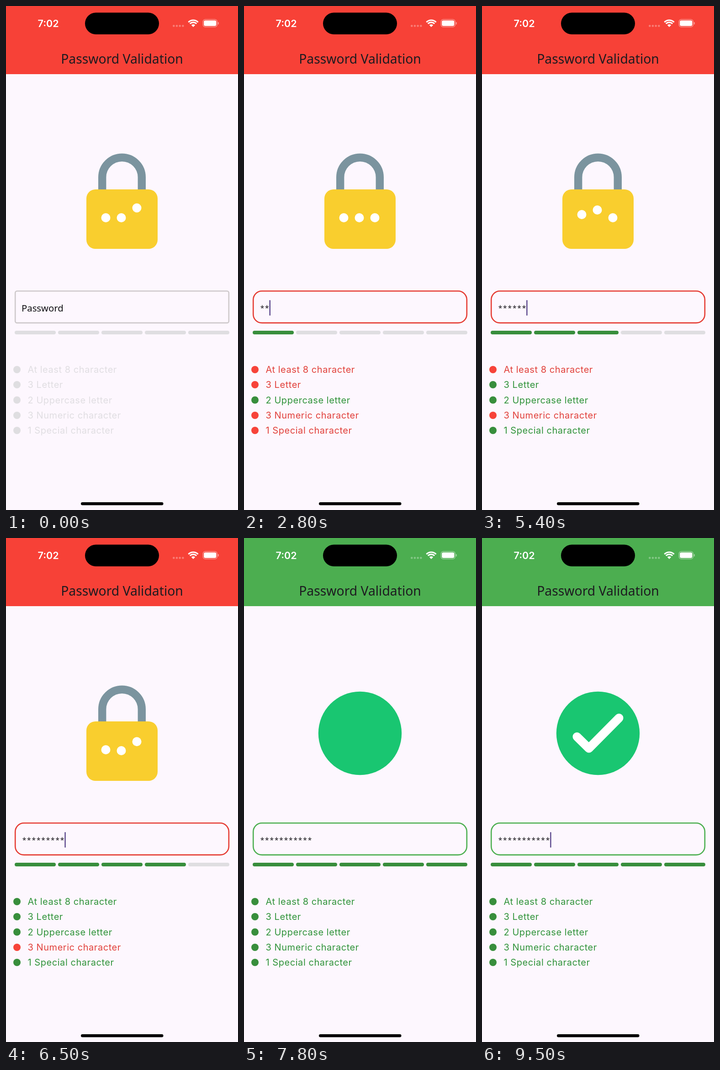
An HTML page with a canvas that plays this animation: 508 px wide and 1102 px high, repeating every 9.6 s.

```html
<!DOCTYPE html>
<html lang="en">
<head>
<meta charset="utf-8">
<title>Password Validation</title>
<style>
  html, body { margin: 0; width: 100%; height: 100%; overflow: hidden; background: #fdf7fe; }
  canvas { display: block; width: 508px; height: 1102px; }
</style>
</head>
<body>
<canvas id="stage" width="508" height="1102"></canvas>
<script>
const ctx = document.getElementById('stage').getContext('2d');

const LOOP = 9600, STEP = 100;
const FOCUS = 1200, VALID = 7200, SWAP = 7400;
const FADE_DELAY = 100, FADE = 200;
const KEYS = [2000, 2500, 3000, 3400, 4500, 5000, 5700, 6000, 6300, 6700, VALID];

const GREY = [223, 222, 225], RED = [247, 67, 57], GREEN = [56, 142, 60];
const BORDER_GREY = [206, 201, 203], BORDER_RED = [229, 61, 52], BORDER_GREEN = [76, 175, 80];

// Each rule is met by a certain keystroke.
const RULES = [
  { text: 'At least 8 character', y: 795, met: KEYS[7] },
  { text: '3 Letter', y: 828, met: KEYS[2] },
  { text: '2 Uppercase letter', y: 861.5, met: KEYS[1] },
  { text: '3 Numeric character', y: 895, met: KEYS[10] },
  { text: '1 Special character', y: 928, met: KEYS[5] },
];

// Height of one bouncing dot: [ms, px]
const BOUNCE = [[0, 0], [33, 17], [67, 21.5], [100, 27.5], [133, 28.5],
                [200, 7], [233, 0], [300, -3], [400, 0]];

const clamp = v => Math.max(0, Math.min(1, v));
const lerp = (a, b, k) => a + (b - a) * k;
const easeOut = k => 1 - (1 - k) ** 3;
const rgb = c => `rgb(${c.map(Math.round).join(',')})`;
const mix = (a, b, k) => rgb(a.map((v, i) => lerp(v, b[i], k)));

function fadeThrough(t, met, [idle, bad, good]) {
  const progress = start => clamp((t - start - FADE_DELAY) / FADE);
  return t < met ? mix(idle, bad, progress(FOCUS)) : mix(bad, good, progress(met));
}

function box(x, y, w, h, r, color) {
  ctx.beginPath();
  ctx.roundRect(x, y, w, h, r);
  ctx.fillStyle = color;
  ctx.fill();
}

function disc(x, y, r, color) {
  ctx.beginPath();
  ctx.arc(x, y, r, 0, Math.PI * 2);
  ctx.fillStyle = color;
  ctx.fill();
}

function text(str, x, y, font, color, spacing = 0, align = 'left') {
  ctx.font = font;
  ctx.fillStyle = color;
  ctx.textAlign = align;
  ctx.letterSpacing = spacing + 'px';
  ctx.fillText(str, x, y);
}

function drawWifi() {
  const x = 410, y = 46, spread = Math.PI * 0.25;
  const arc = r => ctx.arc(x, y, r, -Math.PI / 2 - spread, -Math.PI / 2 + spread);
  ctx.lineCap = 'butt';
  ctx.lineWidth = 3;
  ctx.strokeStyle = '#fff';
  for (const r of [10.2, 15]) {
    ctx.beginPath();
    arc(r);
    ctx.stroke();
  }
  ctx.beginPath();
  ctx.moveTo(x, y);
  arc(6);
  ctx.fillStyle = '#fff';
  ctx.fill();
}

function drawHeader(t) {
  ctx.fillStyle = t < VALID ? '#f74137' : '#4cae50';
  ctx.fillRect(0, 0, 508, 149);
  text('7:02', 69.5, 46, '600 21.5px Inter, sans-serif', '#fff');
  box(173, 14.5, 162, 47.5, 23.75, '#000');
  for (let i = 0; i < 4; i++) disc(367.3 + i * 6.7, 43.5, 2.3, 'rgba(255,255,255,.32)');
  drawWifi();

  ctx.beginPath();
  ctx.roundRect(431.2, 29.4, 31.2, 16.4, 5);
  ctx.lineWidth = 1.2;
  ctx.strokeStyle = 'rgba(255,255,255,.5)';
  ctx.stroke();
  box(433.2, 31.4, 27.2, 12.4, 3.3, '#fff');
  box(463.9, 35, 1.9, 5.5, 1, 'rgba(255,255,255,.5)');

  text('Password Validation', 254, 125.5, '500 28.3px "Noto Sans", sans-serif', '#1d1b20', 0, 'center');
}

function bounce(ms) {
  for (let i = 1; i < BOUNCE.length; i++) {
    const [t0, h0] = BOUNCE[i - 1], [t1, h1] = BOUNCE[i];
    if (ms >= t0 && ms <= t1) return lerp(h0, h1, (ms - t0) / (t1 - t0));
  }
  return 0;
}

function drawLock(t) {
  ctx.beginPath();
  ctx.moveTo(210.7, 404);
  ctx.lineTo(210.7, 374.5);
  ctx.arc(254, 374.5, 43.3, Math.PI, 0);
  ctx.lineTo(297.3, 404);
  ctx.lineCap = 'butt';
  ctx.lineWidth = 17.4;
  ctx.strokeStyle = '#7b949f';
  ctx.stroke();
  box(176, 401, 156, 130, 20, '#f9ce2e');

  // The bounce starts over once the password is valid.
  const phase = t < VALID ? (t + 400) % 800 : t - VALID;
  for (let i = 0; i < 3; i++) {
    disc(218.5 + i * 34, 463 - bounce(phase - i * 500 / 3), 10, '#fff');
  }
}

function drawCheck(ms) {
  disc(254, 427, 91.2 * easeOut(clamp((ms + 100) / 500)), '#19c671');
  if (ms < 800) return;
  if (ms < 1000) {
    disc(210.5, 436.5, lerp(7, 14, clamp((ms - 800) / 100)), '#fff');
    return;
  }
  const pts = [[208, 434.5], [234, 460], [300, 393.5]];
  const legs = [1, 2].map(i => Math.hypot(pts[i][0] - pts[i - 1][0], pts[i][1] - pts[i - 1][1]));
  const k = easeOut(clamp((ms - 900) / 500));
  let left = k * (legs[0] + legs[1]);
  ctx.beginPath();
  ctx.moveTo(...pts[0]);
  legs.forEach((len, i) => {
    const part = clamp(left / len);
    if (part > 0) ctx.lineTo(lerp(pts[i][0], pts[i + 1][0], part), lerp(pts[i][1], pts[i + 1][1], part));
    left -= len;
  });
  ctx.lineCap = ctx.lineJoin = 'round';
  ctx.lineWidth = lerp(28, 19, k);
  ctx.strokeStyle = '#fff';
  ctx.stroke();
}

function drawField(t) {
  const typed = KEYS.filter(k => t >= k);
  const radius = lerp(4, 19, clamp((t - FOCUS) / FADE));
  ctx.beginPath();
  ctx.roundRect(20.2, 623.3, 467.7, 69.6, radius);
  ctx.lineWidth = 2.6;
  ctx.strokeStyle = fadeThrough(t, VALID, [BORDER_GREY, BORDER_RED, BORDER_GREEN]);
  ctx.stroke();

  if (typed.length) {
    text('*'.repeat(typed.length), 34.7, 667.5, '17.33px "Noto Sans Mono", monospace', '#1d1b20');
  } else {
    text('Password', 34, 667.5, '20.3px "Noto Sans", sans-serif', '#111014');
  }

  // The caret blinks once a second, beginning anew with each key.
  const since = t - (typed.at(-1) ?? FOCUS);
  if (since >= 0 && since % 1000 < 500) {
    box(34.7 + typed.length * 10.4, 643, 2.5, 34, 1.2, '#5f4b8f');
  }
}

function drawRules(t) {
  const met = RULES.filter(r => t >= r.met).length;
  for (let i = 0; i < 5; i++) {
    box(19 + i * 95, 710, 90, 8, 4, rgb(i < met ? GREEN : GREY));
  }
  for (const rule of RULES) {
    disc(24, rule.y, 8, fadeThrough(t, rule.met, [GREY, RED, GREEN]));
    const color = t < FOCUS ? '#e0dee2' : t < rule.met ? '#e1413b' : '#30933a';
    text(rule.text, 47.5, rule.y + 7.2, '20px Inter, sans-serif', color, 0.55);
  }
}

function draw(t) {
  ctx.fillStyle = '#fdf7fe';
  ctx.fillRect(0, 0, 508, 1102);
  drawHeader(t);
  if (t < SWAP) drawLock(t);
  else drawCheck(t - SWAP);
  drawField(t);
  drawRules(t);
  box(164, 1085, 180.5, 6.6, 3.3, '#000');
}

const start = performance.now();
function tick() {
  const t = Math.max(0, performance.now() - start) % LOOP;
  draw(Math.floor(t / STEP) * STEP);
  requestAnimationFrame(tick);
}
tick();
</script>
</body>
</html>
```
